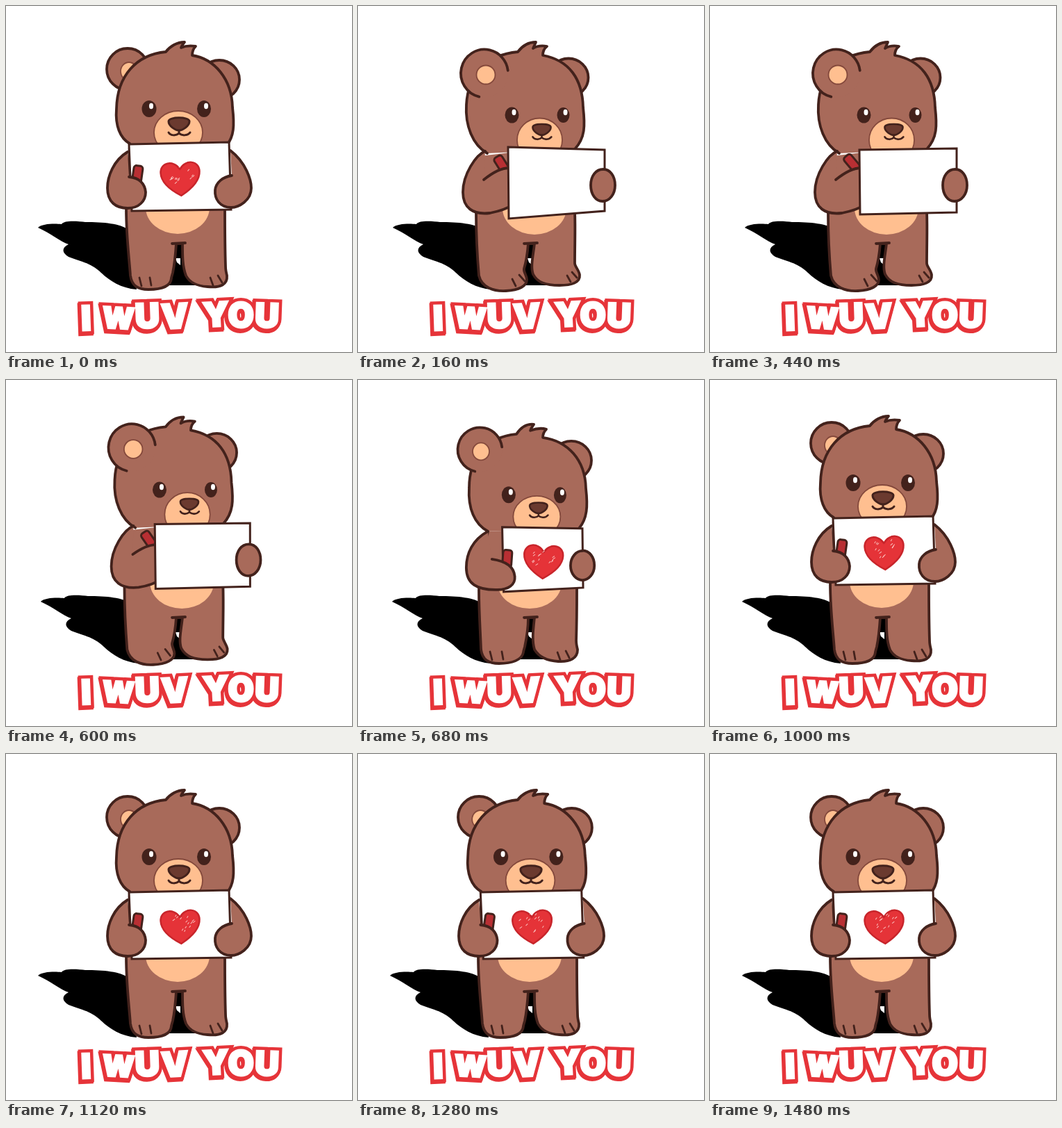
Animation, 498 px wide and 498 px high, one loop 1520 ms. Source, as an HTML page with a canvas:

```html
<!DOCTYPE html>
<html lang="en">
<head>
<meta charset="utf-8">
<title>Bear with a card</title>
<style>
  html, body { margin: 0; width: 100%; height: 100%; overflow: hidden; background: #fff; }
  canvas, svg { position: absolute; left: 0; top: 0; width: 498px; height: 498px; }
  text { font: 900 49px Inter, "Open Sans", sans-serif; text-anchor: middle; }
  .wide { font-size: 42px; }
  .last { font-size: 48px; }
  .edge { fill: #e63439; stroke: #e63439; stroke-width: 12px; stroke-miterlimit: 2; }
  .face { fill: #fff; stroke: #fff; stroke-width: 3px; }
</style>
</head>
<body>
<canvas width="498" height="498"></canvas>
<svg viewBox="0 0 498 498">
  <defs>
    <text id="caption" x="116 138 161 204 244 270 303 338 375" y="467 467 463 464 465 467 462 462 462"
          rotate="-2 0 3 -2 -3 0 -3 0 2">I <tspan class="wide">W</tspan>UV <tspan class="last">YOU</tspan></text>
  </defs>
  <use class="edge" href="#caption" x="-1" y="2"/>
  <use class="edge" href="#caption"/>
  <use class="face" href="#caption"/>
</svg>
<script>
const ctx = document.querySelector('canvas').getContext('2d');
const LOOP = 1520, OUTLINE = 3.8;
const FUR = '#a86a5a', LINE = '#43221c', SOFT = '#84493c', PEACH = '#ffbf90', RED = '#e53338';

// Every part has three poses: showing the card, drawing on it, turning.
const parts = {
  body: [
    'M178,200 L173,292 C173,330 177,360 179,388 C181,403 190,408 205,408 C225,408 237,403 238,392 C238,390 239,388 240,384 C243,370 244,357 245,342 L254,342 C254,360 254,375 259,388 C264,398 275,403 290,404 C310,406 319,400 318,388 C317,384 316,380 316,375 C315,345 315,320 315,292 L318,200',
    'M176,216 L170,298 C170,330 172,365 174,388 C178,405 195,411 213,410 C232,409 243,403 243,394 C243,388 238,383 239,378 C243,365 244,355 245,342 L254,342 C252,360 248,375 252,386 C258,398 270,402 290,402 C308,402 320,398 319,387 C318,380 312,375 312,370 C312,340 313,320 312,295 L310,200',
    'M187,218 L174,302 C174,335 176,360 177,388 C179,403 188,408 203,408 C222,408 236,403 238,392 C238,390 239,388 240,384 C243,370 245,357 245,342 L254,342 C252,360 250,375 254,388 C260,398 270,404 288,405 C306,406 316,400 316,388 C315,384 314,380 314,375 C315,345 315,330 315,302 L318,214'],
  toes: [
    'M192,391 L195,403 M207,391 L209,402 M294,391 L298,402 M305,388 L311,398',
    'M222,393 L227,403 M232,387 L240,396 M301,388 L306,397 M308,383 L315,391',
    'M190,391 L193,403 M207,391 L209,402 M287,392 L291,403 M299,390 L304,400'],
  head: [
    'M178,198 C164,190 157,172 159,148 C160,100 188,70 230,66 C236,58 246,52 257,52 C255,55 253,57 252,60 C259,57 266,57 273,58 C270,61 268,66 268,71 C300,76 325,105 326,146 C329,172 328,188 318,200',
    'M186,212 C165,200 154,172 156,142 C158,100 185,70 230,66 C236,58 245,52 256,52 C255,55 253,58 252,61 C258,57 266,57 272,58 C268,61 266,66 266,71 C304,78 323,105 324,146 C327,172 327,190 312,206',
    'M187,218 C168,208 158,185 160,155 C160,112 185,82 228,78 C234,69 243,63 253,64 C251,67 249,69 248,73 C256,70 264,69 271,71 C268,74 266,79 266,83 C302,88 327,115 328,156 C331,182 330,200 318,214'],
  leftArm: [
    'M175,210 C155,222 146,245 146,262 C146,282 158,291 175,291 C192,291 201,280 201,268 C200,256 192,247 177,246',
    'M183,209 C170,214 151,242 151,268 C151,290 165,301 190,298 C215,293 235,285 235,260 C235,222 206,230 181,250',
    'M187,218 C165,230 156,250 156,270 C156,294 172,302 198,302 C218,303 227,294 226,283 C225,270 214,261 193,258'],
  rightArm: [
    'M323,208 C345,225 353,250 353,262 C353,280 335,290 324,290 C308,290 300,278 301,265 C302,254 312,246 325,244',
    'M353,235 C363,235 370,245 370,258 C370,271 362,281 352,281 C342,281 335,271 335,258 C335,245 342,235 353,235',
    'M323,246 C333,246 340,255 340,267 C340,279 332,288 323,288 C314,288 306,279 306,267 C306,255 314,246 323,246'],
  leftEar: ['175,91,30,30', '182,97,34,34.5', '175.5,100.5,32,32'],
  innerEar: ['177,94,12,13', '184,99,13.5,13.5', '177,103,12,12.5'],
  rightEar: ['307,106,29,28', '303,103,28.5,27.5', '307,116,29,28'],
  leftEye: ['206,148,10.5,12', '221.5,157,10,11.5', '217,165.5,10,12'],
  rightEye: ['285,148,10,12', '295.5,157,9,11', '291,166,9,11.5'],
  muzzle: ['248,182,35,31', '261.5,193,32.5,31.5', '257.5,197,34,30'],
  belly: ['247,290,46,38', '254,291,46,38', '247,292,46,37'],
  nose: ['249,170,1', '264.5,178,.87', '260,184.5,.85'],
  heart: ['251,248,-3', '285,256,4', '267,261,3'],
  shadow: ['0', '4', '3'],
};
// The card and the crayon swing between two drawing positions.
const card = {
  show: 'M177,199 L321,196 L324,293 L181,295 Z',
  turn: 'M208,212 L323,214 L324,299 L210,305 Z',
  draw: ['M216,203 L355,207 L355,295 L217,306 Z', 'M215,207 L355,205 L355,297 L216,300 Z'],
};
const crayon = { show: '191,230,8', turn: '216,245,4', draw: ['200,217,-32', '196,216,-40'] };

const NUMBER = /-?[\d.]+/g;
const mix = (poses, weights) => {
  const values = poses.map(p => p.match(NUMBER));
  let i = 0;
  return poses[0].replace(NUMBER, () => {
    const sum = values.reduce((s, v, k) => s + v[i] * weights[k], 0);
    i++;
    return sum.toFixed(2);
  });
};
const nums = s => s.split(',').map(Number);
const fract = n => n - Math.floor(n);
const random = n => fract(Math.sin(n * 127.1) * 43758.5453);

function paint(path, fill, stroke = LINE, width = OUTLINE) {
  const p = new Path2D(path);
  if (fill) { ctx.fillStyle = fill; ctx.fill(p); }
  if (stroke) { ctx.strokeStyle = stroke; ctx.lineWidth = width; ctx.stroke(p); }
}

function arc(box, from = 0, to = 360) {
  const [x, y, rx, ry] = nums(box), p = new Path2D(), rad = Math.PI / 180;
  p.ellipse(x, y, rx, ry, 0, from * rad, to * rad);
  return p;
}

function at(x, y, degrees, scale, draw) {
  ctx.save();
  ctx.translate(x, y);
  ctx.rotate(degrees * Math.PI / 180);
  ctx.scale(scale, scale);
  draw();
  ctx.restore();
}

function drawShadow(shift) {
  at(+shift, 0, 0, 1, () => paint('M46,319 C52,313 70,313 80,314 C84,308 104,310 114,311 C140,311 165,313 176,322 L188,408 C165,406 150,396 137,384 C122,369 104,367 90,361 C80,355 80,348 90,343 C78,339 64,327 46,319', '#000', null));
  paint('M240,343 L256,343 L272,402 L232,402 Z', '#000', null);
  paint('M244,363 L251,363 L251,373 L246,369 Z', '#fff', null);
}

function drawEye(box) {
  const [x, y] = nums(box);
  paint(arc(box), LINE, null);
  paint(arc([x + 3, y - 4, 3, 4.2].join()), '#fff', null);
}

function drawNose(box) {
  const [x, y, scale] = nums(box);
  at(x, y, 0, scale, () => {
    paint('M-15,-4 C-15,-11 15,-11 15,-4 C15,3 5,9 0,9 C-5,9 -15,3 -15,-4 Z', '#6b3a2f', LINE, 3);
    paint('M-15,12 C-12,17 -4,17 0,13 C4,17 12,17 16,12 M0,9 L0,13', null, LINE, 3);
  });
}

function drawHeart(box, step) {
  const [x, y, angle] = nums(box);
  at(x, y, angle, 1, () => {
    paint('M0,25 C-12,18 -28,6 -28,-9 C-28,-24 -9,-28 0,-13 C9,-28 28,-24 28,-9 C28,6 12,18 0,25 Z', RED, '#c8252b', 2.5);
    for (let i = 0; i < 14; i++) {
      const seed = i * 3 + step * 50 + 1, a = random(seed) * 6.28, r = 8 + random(seed + 1) * 12;
      const dx = Math.cos(a) * r, dy = Math.sin(a) * r * .7 - 4;
      paint(`M${dx},${dy} l${1 + random(seed + 2) * 2},-2`, null, 'rgba(255,225,220,.8)', 1);
    }
  });
}

function drawCrayon(box) {
  const [x, y, angle] = nums(box);
  at(x, y, angle, 1, () => {
    const p = new Path2D();
    p.roundRect(-6.5, 0, 13, 25, 4);
    paint(p, '#b82f33', LINE, 3);
  });
}

function drawLeftEar(pose, from, to) {
  paint(arc(pose.leftEar), FUR, null);
  paint(arc(pose.leftEar, from, to), null);
  paint(arc(pose.innerEar), PEACH, SOFT, 1.8);
}

function poseWeights(t) {
  if (t < 40 || t >= 820) return [1, 0, 0];
  if (t < 560) return [0, 1, 0];
  if (t < 680) {
    const u = ((t - 560) / 120) ** 2;
    return [0, 1 - u, u];
  }
  const u = 1 - (1 - (t - 680) / 140) ** 2;
  return [u, 0, 1 - u];
}

function draw(t) {
  const w = poseWeights(t), pose = {};
  for (const name in parts) pose[name] = mix(parts[name], w);
  const swing = t < 560 ? .5 - .5 * Math.cos((t - 160) / 187 * 2 * Math.PI) : 1;
  const held = thing => mix([thing.show, mix(thing.draw, [1 - swing, swing]), thing.turn], w);
  const sketching = t >= 40 && t < 620, earInFront = w[0] < .5;

  ctx.clearRect(0, 0, 498, 498);
  ctx.lineCap = ctx.lineJoin = 'round';
  drawShadow(pose.shadow);
  paint(pose.body, FUR);
  paint(arc(pose.belly), PEACH, null);
  paint('M239,342 L258,341', null);
  paint(pose.toes, null, LINE, 2.8);

  const breath = t > 1160 && t < 1440 ? Math.sin((t - 1160) / 280 * Math.PI) : 0;
  ctx.save();
  ctx.translate(248, 0);
  ctx.scale(1 + .01 * breath, 1);
  ctx.translate(-248, 0);

  paint(arc(pose.rightEar), FUR);
  if (!earInFront) drawLeftEar(pose, 0, 360);
  paint(pose.head, FUR);
  if (earInFront) drawLeftEar(pose, 103, 353);
  paint(arc(pose.muzzle), PEACH, SOFT, 1.8);
  drawEye(pose.leftEye);
  drawEye(pose.rightEye);
  drawNose(pose.nose);

  const drawArm = () => {
    drawCrayon(held(crayon));
    paint(pose.leftArm, FUR);
  };
  if (sketching) drawArm();
  ctx.lineJoin = 'miter';
  paint(held(card), '#fff', LINE, 3);
  ctx.lineJoin = 'round';
  if (!sketching) {
    drawHeart(pose.heart, Math.floor(t / 160));
    drawArm();
  }
  paint(pose.rightArm, FUR);
  ctx.restore();
}

const start = performance.now();
function tick() {
  draw((performance.now() - start) % LOOP);
  requestAnimationFrame(tick);
}
tick();
</script>
</body>
</html>
```
